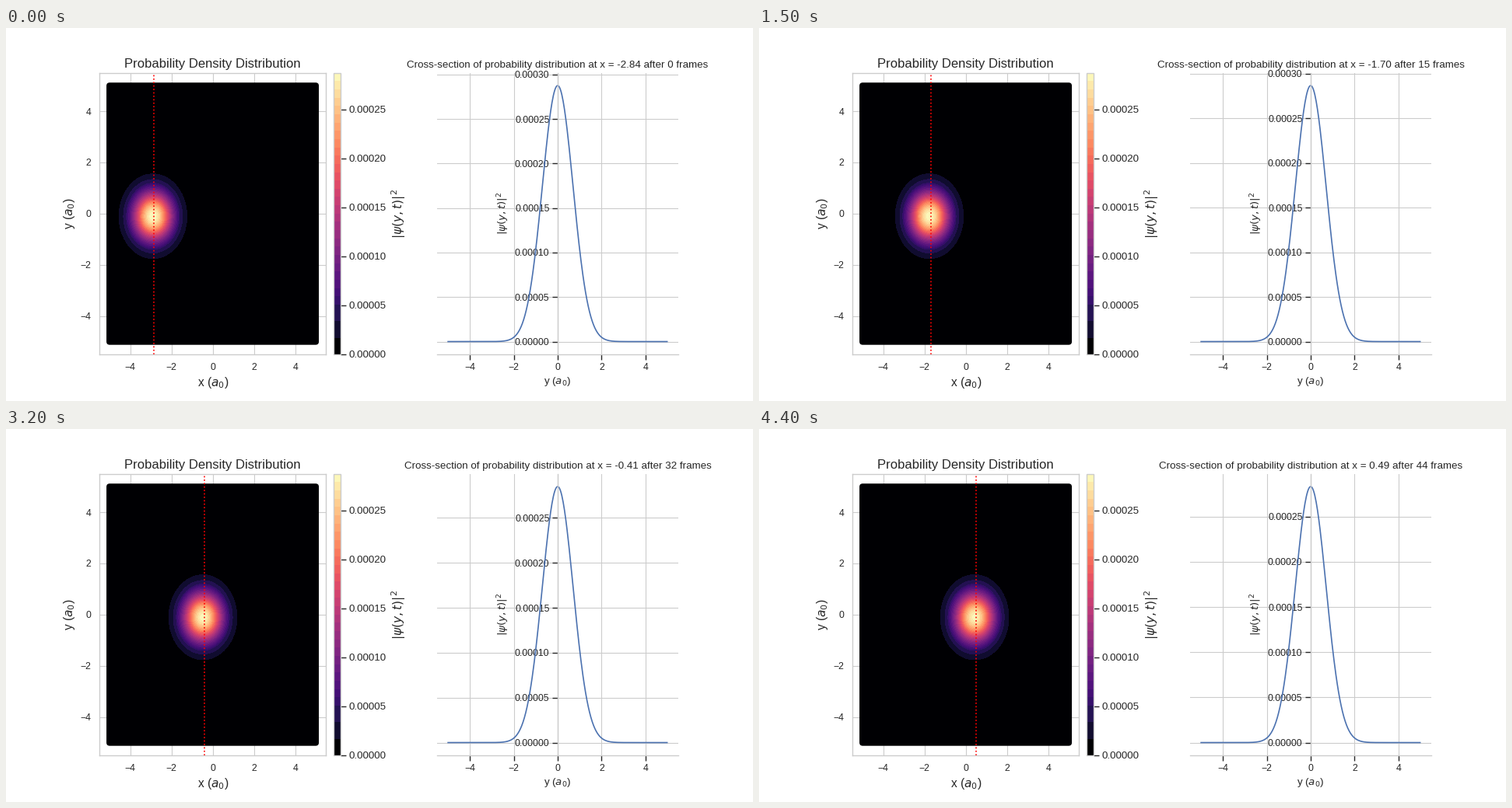
A matplotlib script that plays this animation: 960 px wide and 480 px high, repeating every 4500 ms.

```python
import numpy as np
import matplotlib.pyplot as plt
from matplotlib.animation import FuncAnimation
from matplotlib.colors import ListedColormap
from matplotlib.patches import FancyBboxPatch
from matplotlib.ticker import FormatStrFormatter, MultipleLocator

plt.rcParams.update({
    "font.family": "Liberation Sans",
    "text.color": ".15",
    "axes.labelcolor": ".15",
    "axes.edgecolor": ".8",
    "axes.linewidth": 1.25,
    "axes.axisbelow": True,
    "grid.color": ".8",
    "grid.linewidth": 1,
})
for side in "xy":
    plt.rcParams.update({
        side + "tick.color": ".15",
        side + "tick.labelsize": 11,
        side + "tick.major.size": 6,
        side + "tick.major.width": 1.25,
    })

W, H, DPI = 960, 480, 80
FRAMES, INTERVAL = 45, 100
STEP = 0.03                 # grid spacing of the simulation
PEAK, VAR = 2.876e-4, 0.49  # initial height and variance of the packet
LABEL = r"$|\psi(y,t)|^2$"
DOT = 4.17                  # marker radius in pixels

fig = plt.figure(figsize=(W / DPI, H / DPI), dpi=DPI, facecolor="white")


def add_axes(x, width):
    return fig.add_axes([x / W, 0.125, width / W, 0.755])


left, cax, right = add_axes(120, 291.4), add_axes(420.7, 9.3), add_axes(554, 310)
px_x, px_y = 291.4 / 11, 0.755 * H / 11


def packet(n):
    """Centre, height and variance of the slowly spreading packet."""
    height = PEAK - 1.51e-8 * n ** 1.5
    return 71.8 + 2.523 * n, height, VAR * PEAK / height


def banded_magma(bands=34):
    """Magma in flat steps, with wider steps at the dark end."""
    k = np.arange(bands)
    pos = np.where(k < 6, k // 2 * 2 + 1, k + 0.5) / bands
    colors = plt.get_cmap("magma")(pos)
    colors[:2] = 0, 0, 3 / 255, 1
    return ListedColormap(colors)


# Density map
gx = np.linspace(-5, 5, 1061)[:-1] + 5 / 1060
gy = np.linspace(-2.5, 2.5, 661)[:-1] + 2.5 / 660


def density(n):
    k, height, var = packet(n)
    # overlapping markers shift the visible packet slightly left and down
    dx = gx - (STEP * k - 5) + 1.1 / px_x
    dy = gy + 3.6 / px_y
    return height * np.outer(np.exp(-dy ** 2 / (2 * var)), np.exp(-dx ** 2 / (2 * var)))


left.add_patch(FancyBboxPatch(
    (-5, -5), 9.99, 9.99, boxstyle=f"round,pad={DOT / px_x},rounding_size={DOT / px_x}",
    mutation_aspect=px_x / px_y, fc=(0, 0, 3 / 255), ec="none", zorder=1))
image = left.imshow(density(0), extent=(-5, 5, -2.5, 2.5), origin="lower", aspect="auto",
                    cmap=banded_magma(), vmin=0, vmax=PEAK,
                    interpolation="nearest", zorder=1.1)
marker = left.axvline(0, color="red", ls=":", lw=1.5)
left.set(xlim=(-5.5, 5.5), ylim=(-5.5, 5.5))
left.set_xlabel("x ($a_0$)", fontsize=14)
left.set_ylabel("y ($a_0$)", fontsize=14)
left.set_title("Probability Density Distribution", fontsize=15, y=1)
left.tick_params(bottom=False, left=False)

bar = fig.colorbar(image, cax=cax, ticks=MultipleLocator(5e-5),
                   format=FormatStrFormatter("%.5f"))
bar.set_label(LABEL, fontsize=14)
bar.ax.tick_params(labelsize=12)

# Cross-section
ys = -5 + STEP * np.arange(334)
curve, = right.plot([], [], color="#4C72B0", lw=1.5)
right.spines["left"].set_position("zero")
for side in ("top", "right"):
    right.spines[side].set_visible(False)
right.set_xlim(-5.5, 5.5)
right.set_xlabel("y ($a_0$)", fontsize=12)
right.set_ylabel(LABEL, fontsize=12)
right.yaxis.set_major_locator(MultipleLocator(5e-5))
right.yaxis.set_major_formatter(FormatStrFormatter("%.5f"))
title = right.set_title("", fontsize=12, y=1)

for ax in (left, right):
    ax.grid(True)
    ax.xaxis.set_major_locator(MultipleLocator(2))
left.yaxis.set_major_locator(MultipleLocator(2))


def update(n):
    k, height, var = packet(n)
    x = STEP * round(k) - 5
    image.set_data(density(n))
    marker.set_xdata([x, x])
    curve.set_data(ys, height * np.exp(-ys ** 2 / (2 * var)))
    right.set_ylim(-0.05 * height, 1.05 * height)
    title.set_text(f"Cross-section of probability distribution at x = {x:.2f} after {n} frames")
    return image, marker, curve, title


anim = FuncAnimation(fig, update, frames=FRAMES, interval=INTERVAL,
                     init_func=lambda: update(0), repeat=True, repeat_delay=0)
plt.show()
```
